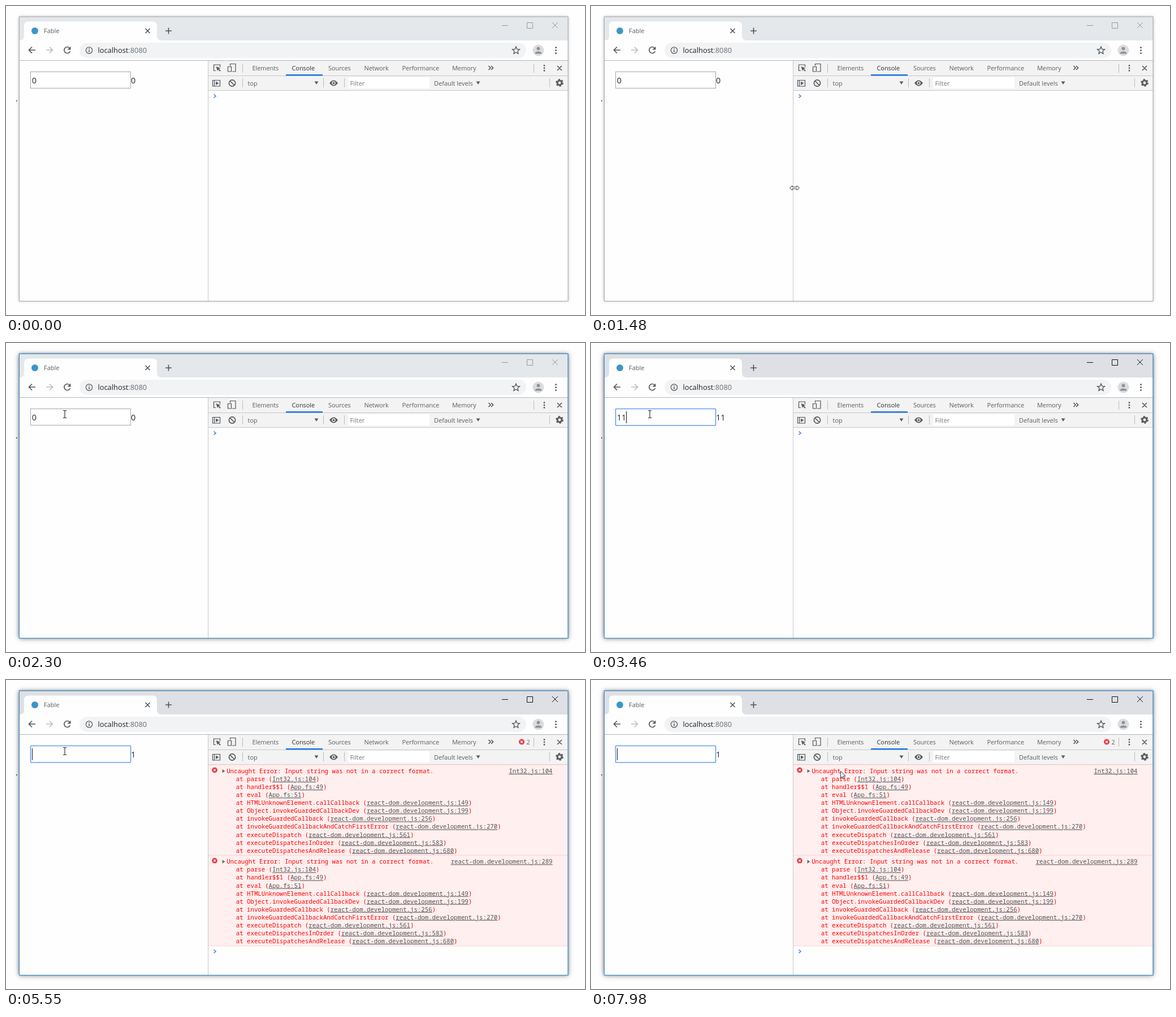
Recreate the animation shown at these times as an HTML page. Size 1024 by 547 pixels, loop 8 s.

```html
<!DOCTYPE html>
<html lang="en">
<head>
<meta charset="utf-8">
<title>Input console</title>
<style>
html, body { margin: 0; width: 100%; height: 100%; overflow: hidden; background: #fefefe; }
svg { position: absolute; left: 0; top: 0; }
#shadow, #shadow-on { position: absolute; left: 23px; top: 19px; width: 971px; height: 503px; }
#shadow { box-shadow: 0 0 5px rgba(0,0,0,.3); }
#shadow-on { box-shadow: 0 1px 9px rgba(0,0,0,.42); }

text { font: 11px "Open Sans", "Noto Sans", sans-serif; fill: #5a5d61; white-space: pre; }
.tab { letter-spacing: -.1px; }
.url { font-size: 12.85px; }
.num text { font-size: 14.4px; fill: #212529; }
.mono text { font: 10.716px "Noto Sans Mono", "DejaVu Sans Mono", monospace; fill: #f00; }
.mono .link { fill: #545454; text-decoration: underline; }
.line { fill: none; stroke: #4d5156; stroke-width: 1.6; }
.thin { stroke-width: 1.2; }
.icon { fill: #5a5d61; }
.sep { stroke: #c6c6c6; fill: none; }
.buttons { fill: none; stroke: #96989b; }
.buttons.dark { stroke: #111; }

/* State changes */
.step, #shadow-on { animation: 8s step-end infinite; }
.active, #shadow-on { animation-name: active; }
.focus { animation-name: focus; }
.in0, .out0 { animation-name: zero; }
.in1 { animation-name: inOne; }
.out1 { animation-name: outOne; }
.eleven { animation-name: eleven; }
.errors { animation-name: errors; }
.clean { animation-name: clean; }
.caret { animation-name: caret; }
.arrow { animation-name: arrow; }
.resize { animation-name: resize; }
.beam { animation-name: beam; }
#pointer { animation: move 8s linear infinite; }

@keyframes active { 0% { opacity: 0 } 28.6%, 100% { opacity: 1 } }
@keyframes focus { 0% { opacity: 0 } 29.125%, 100% { opacity: 1 } }
@keyframes zero { 0% { opacity: 1 } 41%, 100% { opacity: 0 } }
@keyframes inOne { 0% { opacity: 0 } 41% { opacity: 1 } 43.25% { opacity: 0 } 58.25% { opacity: 1 } 68.625%, 100% { opacity: 0 } }
@keyframes outOne { 0% { opacity: 0 } 41% { opacity: 1 } 43.25% { opacity: 0 } 58.25%, 100% { opacity: 1 } }
@keyframes eleven { 0% { opacity: 0 } 43.25% { opacity: 1 } 58.25%, 100% { opacity: 0 } }
@keyframes errors { 0% { opacity: 0 } 69.375%, 100% { opacity: 1 } }
@keyframes clean { 0% { opacity: 1 } 69.375%, 100% { opacity: 0 } }
@keyframes caret {
  0% { opacity: 0; transform: translateX(54px) }
  29.125% { opacity: 1; transform: translateX(54px) }
  35.75% { opacity: 0; transform: translateX(54px) }
  41% { opacity: 1; transform: translateX(54px) }
  43.25% { opacity: 1; transform: translateX(62px) }
  50.25% { opacity: 0; transform: translateX(62px) }
  56.5% { opacity: 1; transform: translateX(62px) }
  58.25% { opacity: 1; transform: translateX(54px) }
  62.5% { opacity: 0; transform: translateX(54px) }
  68.625% { opacity: 1; transform: translateX(46px) }
  75.625% { opacity: 0; transform: translateX(46px) }
  82.125% { opacity: 1; transform: translateX(46px) }
  88.625% { opacity: 0; transform: translateX(46px) }
  95.125%, 100% { opacity: 1; transform: translateX(46px) }
}
@keyframes arrow { 0% { opacity: 0 } 1.625% { opacity: 1 } 18.5% { opacity: 0 } 19.75% { opacity: 1 } 26.5% { opacity: 0 } 91%, 100% { opacity: 1 } }
@keyframes resize { 0% { opacity: 0 } 18.5% { opacity: 1 } 19.75%, 100% { opacity: 0 } }
@keyframes beam { 0% { opacity: 0 } 26.5% { opacity: 1 } 91%, 100% { opacity: 0 } }
@keyframes move {
  0%, 1.625% { transform: translate(938px, 529px); animation-timing-function: cubic-bezier(.4,.2,.8,.8) }
  11.625% { transform: translate(647px, 414px) }
  18.5%, 19.75% { transform: translate(360px, 322px) }
  21.875% { transform: translate(258px, 264px); animation-timing-function: cubic-bezier(.3,.4,.6,1) }
  28%, 88.7% { transform: translate(104px, 126px) }
  92.625% { transform: translate(307.5px, 161px) }
  95% { transform: translate(365px, 177px); animation-timing-function: ease-out }
  98.125%, 99.37% { transform: translate(435px, 162px) }
  99.375%, 99.74% { transform: translate(438px, 161.5px) }
  99.75%, 100% { transform: translate(441px, 161px) }
}
</style>
</head>
<body>
<div id="shadow"></div>
<div id="shadow-on"></div>
<svg width="1024" height="547" viewBox="0 0 1024 547">
  <rect x="18" y="167" width="1.5" height="2" fill="#333"/>

  <!-- window and tab strip -->
  <rect x="23" y="19" width="971" height="504" fill="#fefefe"/>
  <rect x="24" y="19" width="970" height="42" fill="#e4e8eb"/>
  <rect class="step focus" x="24" y="19" width="970" height="42" fill="#dee0e5"/>
  <path d="M24 61Q32 61 32 53V35Q32 27.500 39.500 27.500H259.500Q267 27.500 267 35V53Q267 61 275 61Z" fill="#fefefe"/>
  <circle cx="51" cy="44" r="6" fill="#3d96c6"/>
  <text x="67" y="48">Fable</text>
  <path class="line" d="M246.500 40l8 8m0-8l-8 8M287.500 38.500v11M282 44h11"/>
  <g class="buttons"><path id="controls" d="M877 34.500h11M921.500 29.500h10v10h-10zM966 29l10 10m0-10l-10 10"/></g>
  <g class="buttons dark step focus"><use href="#controls"/></g>

  <!-- address bar -->
  <rect x="130" y="65" width="790" height="27" rx="13.500" fill="#f1f3f4"/>
  <path class="line" d="M52 78H40.500M46 72.500L40.500 78l5.500 5.500"/>
  <path class="line" d="M71 78h11.500M77 72.500l5.500 5.500-5.500 5.500" style="stroke:#b9bbbe"/>
  <path class="line" d="M112.300 74.200A5.500 5.500 0 1 0 113.500 80"/>
  <path class="icon" d="M114.500 71.500v6h-6z"/>
  <circle class="line thin" cx="147" cy="78.500" r="5.600"/>
  <path class="line" d="M147 78v3.500M147 75v1.600"/>
  <text class="url" x="162.500" y="83"><tspan fill="#202124">localhost</tspan><tspan fill="#6a6e73">:8080</tspan></text>
  <path class="line" style="stroke-width:1.300" d="M902 72l1.800 4.300 4.700.4-3.600 3.100 1.100 4.600-4-2.500-4 2.500 1.100-4.600-3.600-3.100 4.700-.4z"/>
  <circle cx="941.500" cy="78.500" r="10" fill="#dadce0"/>
  <g fill="#8d9094"><circle cx="941.500" cy="75.300" r="2.900"/><path d="M935.500 84.500q0-4 6-4t6 4z"/></g>
  <g class="icon"><circle cx="972.500" cy="73.500" r="1.500"/><circle cx="972.500" cy="78.500" r="1.500"/><circle cx="972.500" cy="83.500" r="1.500"/></g>
  <path d="M24 96.500H994" stroke="#b4b6b8"/>

  <!-- page -->
  <rect x="43.500" y="116.500" width="177" height="29" fill="#fff" stroke="#a6a6a6"/>
  <rect class="step focus" x="43.500" y="116.500" width="177" height="29.500" rx="1" fill="#fff" stroke="#669df0" stroke-width="1.600"/>
  <g class="num">
    <text class="step in0" x="45.800" y="137">0</text>
    <text class="step in1" x="45.800" y="137">1</text>
    <text class="step eleven" x="45.800" y="137">11</text>
    <text class="step out0" x="221" y="137">0</text>
    <text class="step out1" x="221" y="137">1</text>
    <text class="step eleven" x="221" y="137">11</text>
  </g>
  <rect class="step caret" y="121" width="1" height="21" fill="#111"/>

  <!-- developer tools -->
  <rect x="357" y="97" width="637" height="53" fill="#f3f3f3"/>
  <path class="sep" d="M357.500 97V522M357 123.500H994M357 149.500H994"/>
  <path class="sep" style="stroke:#bbb" d="M418.500 102v16M933.500 102v16M418.500 128v16M561.500 128v16M598.500 128v16M961.500 128v16"/>
  <rect x="495" y="121" width="65" height="2.400" fill="#1a73e8"/>
  <g class="tab">
    <text x="435.500" y="114">Elements</text>
    <text x="505.500" y="114" style="fill:#333">Console</text>
    <text x="570" y="114">Sources</text>
    <text x="633.500" y="114">Network</text>
    <text x="700.500" y="114">Performance</text>
    <text x="789" y="114">Memory</text>
  </g>
  <path class="line thin" d="M371 114.500h-3.500v-10.500h11v4"/>
  <path class="icon" d="M371.500 107l8 3-3 1.300 3.300 3.300-1.300 1.300-3.300-3.300-1.200 2.700z"/>
  <path class="line thin" d="M396.500 106v-3.500h9.500v13.500h-6M392.500 107.500h6v8.500h-6z"/>
  <path class="line" d="M853.500 106l3.500 3.500-3.500 3.500M858 106l3.500 3.500-3.500 3.500M975 106l8 8m0-8l-8 8"/>
  <g class="icon"><circle cx="952" cy="105.500" r="1.400"/><circle cx="952" cy="110" r="1.400"/><circle cx="952" cy="114.500" r="1.400"/></g>

  <path class="line thin" d="M365.500 131.500h13v10.500h-13zM368.500 131.500v10.500"/>
  <path class="icon" d="M371 133.500l5.500 3.200-5.500 3.300z"/>
  <path class="line" d="M396.200 132.700l7.600 7.600M405.600 136.500a5.600 5.600 0 1 1-11.200 0a5.600 5.600 0 1 1 11.200 0"/>
  <text x="427.500" y="141">top</text>
  <path class="icon" d="M545.500 133.500h7l-3.500 5.500zM831.500 133.500h7l-3.500 5.500z"/>
  <path class="icon" d="M572 136.500q7.500-10 15 0q-7.500 10-15 0z"/>
  <circle cx="579.500" cy="136.500" r="2.500" class="icon" stroke="#f3f3f3" stroke-width="1.300"/>
  <rect x="605" y="126" width="144" height="20" fill="#fff"/>
  <text x="608.500" y="141" style="fill:#757575">Filter</text>
  <text x="757" y="140.500">Default levels</text>
  <circle cx="979" cy="136" r="3.900" fill="none" stroke="#5a5d61" stroke-width="3"/>
  <circle cx="979" cy="136" r="5.900" fill="none" stroke="#5a5d61" stroke-width="2" stroke-dasharray="3.090 3.090"/>

  <path class="step clean line" style="stroke:#3b85e8" d="M367.500 156.500l3.500 3-3.500 3"/>
  <g class="step errors">
    <circle cx="912" cy="109.500" r="5" fill="#e33b41"/>
    <path d="M910 107.500l4 4m0-4l-4 4" stroke="#fff" stroke-width="1.200"/>
    <text x="920.500" y="114">2</text>
    <g class="mono" id="log"></g>
    <path class="line" style="stroke:#3b85e8" d="M367.500 477.500l3.500 3-3.500 3"/>
  </g>

  <!-- window frame -->
  <rect x="23.500" y="19" width="970.500" height="503.500" fill="none" stroke="#a5a6a8"/>
  <rect class="step active" x="23.500" y="19" width="970.500" height="503.500" fill="none" stroke="#2b88cf"/>

  <g id="pointer">
    <path class="step arrow" d="M.5.5V12.500L3.300 9.900 5.400 14.700 7.300 13.900 5.300 9.200H9z" fill="#fff" stroke="#222" stroke-width=".9"/>
    <path class="step resize" d="M-8.500 0l4.500-4v2.500H4V-4L8.500 0 4 4V1.500H-4V4z" fill="#fff" stroke="#222" stroke-width=".9"/>
    <path class="step beam" d="M-3-6.500H-1L0-5.800 1-6.500H3M0-5.800V5.800M-3 6.500H-1L0 5.800 1 6.500H3" fill="none" stroke="#222" stroke-width="1.100"/>
  </g>
</svg>
<script>
const dom = 'react-dom.development.js:';
const stack = [
  ['parse', 'Int32.js:104'],
  ['handler$$1', 'App.fs:49'],
  ['eval', 'App.fs:51'],
  ['HTMLUnknownElement.callCallback', dom + 149],
  ['Object.invokeGuardedCallbackDev', dom + 199],
  ['invokeGuardedCallback', dom + 256],
  ['invokeGuardedCallbackAndCatchFirstError', dom + 270],
  ['executeDispatch', dom + 561],
  ['executeDispatchesInOrder', dom + 583],
  ['executeDispatchesAndRelease', dom + 680]
];

function errorBlock(top, link) {
  const rows = stack.map(([name, file], i) =>
    `<text x="406.800" y="${top + 29.1 + i * 14.06}">at ${name} (<tspan class="link">${file}</tspan>)</text>`);
  return `<rect x="358" y="${top}" width="636" height="160.500" fill="#ffefef"/>
    <path d="M358 ${top}H994M358 ${top + 160.5}H994" stroke="#ffd3d3"/>
    <circle cx="369" cy="${top + 9.5}" r="4.800" fill="#e33b41"/>
    <path d="M367.200 ${top + 7.7}l3.600 3.600m0-3.600l-3.600 3.600" stroke="#fff" stroke-width="1.200"/>
    <path d="M382.500 ${top + 8}l5 3.300-5 3.300z" fill="#6e6e6e"/>
    <text x="390.200" y="${top + 15}">Uncaught Error: Input string was not in a correct format.</text>
    <text class="link" x="966.500" y="${top + 15}" text-anchor="end">${link}</text>` + rows.join('');
}

document.getElementById('log').innerHTML =
  errorBlock(150, 'Int32.js:104') + errorBlock(310.3, dom + 289);
</script>
</body>
</html>
```
